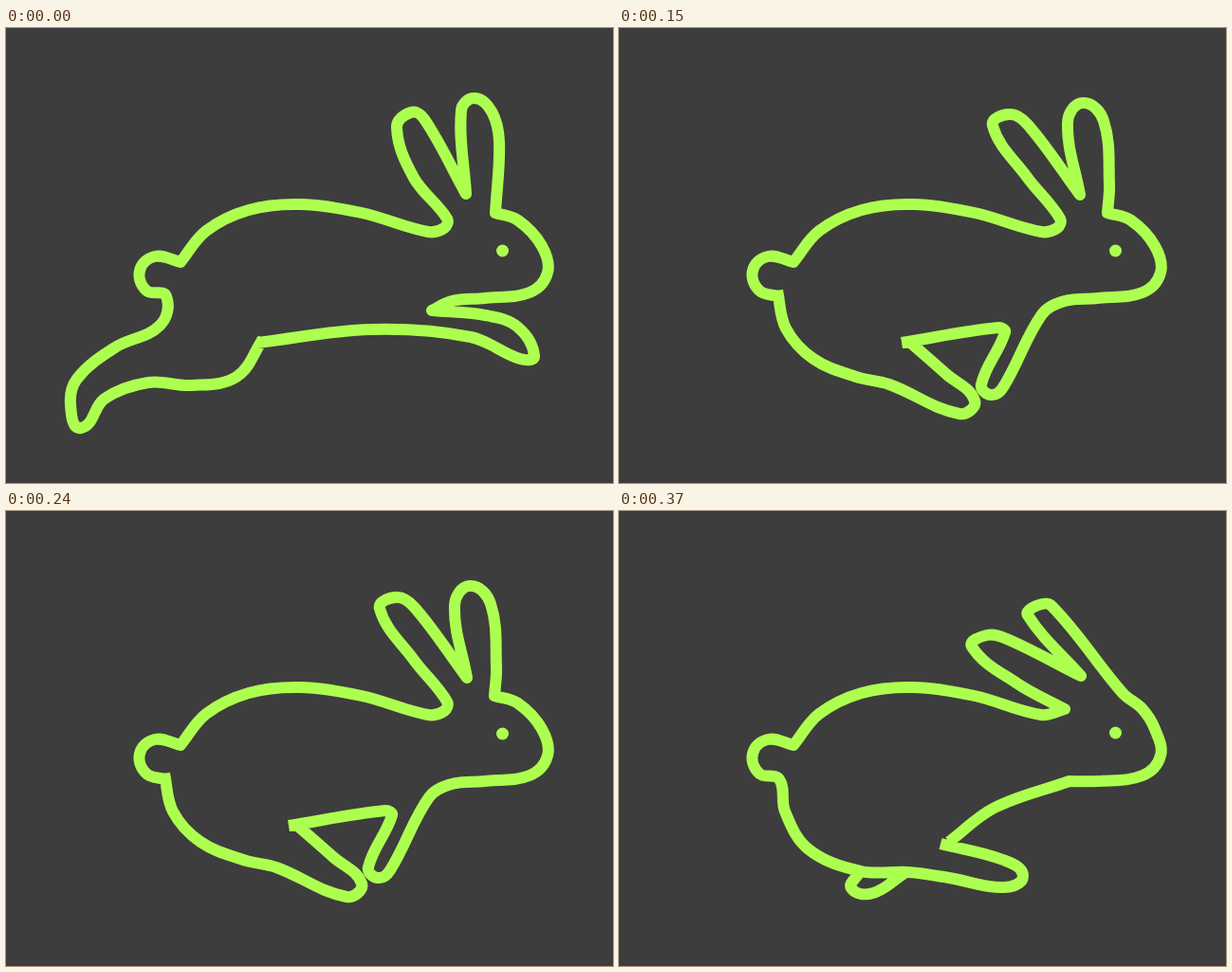
An HTML page that plays this animation: 640x480 px, repeating every 420 ms.

```html
<!DOCTYPE html>
<html lang="en">
<head>
<meta charset="utf-8">
<title>Running rabbit</title>
<style>
  html, body { margin: 0; height: 100%; overflow: hidden; background: #3d3d3d; }
  svg { display: block; width: 640px; height: 480px; }
</style>
</head>
<body>
<svg viewBox="0 0 640 480">
  <path fill="#403a3c" d="M0 477H640V480H0Z"/>
  <path id="body" fill="none" stroke="#adff4f" stroke-width="12" stroke-linejoin="round"/>
  <circle id="eye" cx="523.5" cy="235" r="6.5" fill="#adff4f"/>
</svg>
<script>
  const body = document.getElementById('body');
  const eye = document.getElementById('eye');

  // Outlines are knots of smooth curves; "|" marks a corner, "/" a new line.
  const back = '169,283 148,277 141,256 157,241 184,247 | 211,214 256,192 310,186 375,195 445,215';
  const neck = '462,211 465,201';
  const face = '565,230 571,258 552,279 505,285';
  const head = `| 540,203 ${face} 470,288`;

  const stretch = `271,328 243,368 195,377 150,374 104,391 79,422 68,397 75,370 115,337 162,314
    ${back} ${neck} 430,158 412,105 427,89 441,96 485,175 |
    480,87 494,74 512,88 520,120 516,195 ${head}
    449,298 | 505,303 539,315 557,346 542,349 490,326 385,318 265,332`;

  const gather = `304,329 345,365 375,393 359,407 285,376 250,368 205,349 176,317 167,277 /
    ${back} ${neck} 430,157 394,103 412,91 431,102 486,176 |
    473,100 489,79 511,98 517,165 515,195 ${head}
    446,302 405,379 392,387 382,376 407,321 400,316 298,332`;

  const land = `253,382 245,398 268,403 301,382 /
    339,351 405,368 426,385 405,397 348,387 305,381 255,380 200,357 175,317
    ${back} 470,209 | 420,182 372,143 388,131 409,135 487,174 |
    431,110 440,100 456,100 531,192 552,209 ${face} 475,285 | 396,313 348,349`;

  function smooth(knots) {
    // Unit tangent along the chord between a knot's neighbours.
    const tangent = i => {
      const [a, b] = knots[Math.max(i - 1, 0)];
      const [c, d] = knots[Math.min(i + 1, knots.length - 1)];
      const size = Math.hypot(c - a, d - b);
      return [(c - a) / size, (d - b) / size];
    };
    return knots.slice(1).map(([x, y], i) => {
      const [px, py] = knots[i];
      const reach = 0.36 * Math.hypot(x - px, y - py);
      const [ux, uy] = tangent(i);
      const [vx, vy] = tangent(i + 1);
      return 'C' + [px + ux * reach, py + uy * reach, x - vx * reach, y - vy * reach, x, y];
    }).join('');
  }

  function outline(text) {
    return text.split('/').map(line => {
      let last;
      return line.split('|').map(part => {
        const knots = part.trim().split(/\s+/).map(p => p.split(',').map(Number));
        const start = last ? '' : 'M' + knots[0];
        if (last) knots.unshift(last);
        last = knots[knots.length - 1];
        return start + smooth(knots);
      }).join('');
    }).join('');
  }

  const [leap, tuck, touch] = [stretch, gather, land].map(outline);

  function draw() {
    const t = performance.now() % 420;
    body.setAttribute('d', t < 150 ? leap : t < 300 ? tuck : touch);
    eye.setAttribute('cy', t < 300 ? 235 : 234);
    requestAnimationFrame(draw);
  }
  draw();
</script>
</body>
</html>
```
